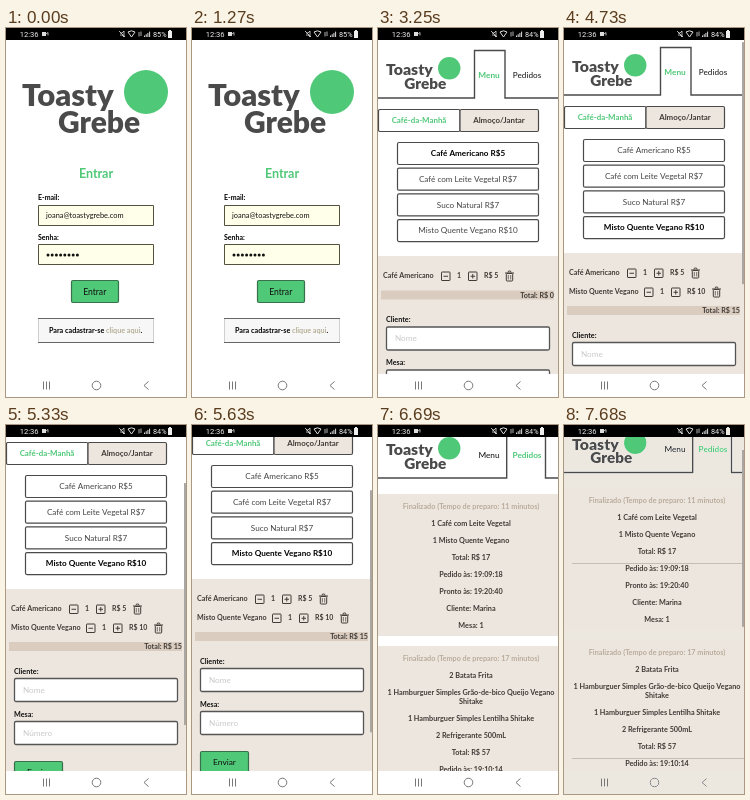
An HTML page with a canvas that plays this animation: 180 px wide and 369 px high, repeating every 8000 ms.

```html
<!DOCTYPE html>
<html lang="pt-BR">
<head>
<meta charset="utf-8">
<style>
html, body { margin: 0; width: 100%; height: 100%; overflow: hidden; background: #fff; }
canvas { display: block; width: 180px; height: 369px; }
</style>
</head>
<body>
<canvas id="stage"></canvas>
<script>
const W = 180, H = 369, LOOP = 8000;
const BAR = 12, NAV = 346;
const GREEN = '#4fc878', DARK = '#4a4a4a', INK = '#403b37', BEIGE = '#ede6de', BAND = '#dacdc0';
const WARM = '#ece8df', WARM_START = 7420;
const canvas = document.getElementById('stage');
const ctx = canvas.getContext('2d');
const ratio = Math.max(1, window.devicePixelRatio || 1);
canvas.width = W * ratio;
canvas.height = H * ratio;

// Each step is [start time, scroll offset].
const SCROLL = [
  [0, 0], [4590, 2], [4730, 3], [5130, 12], [5230, 36], [5330, 64], [5430, 84],
  [5530, 82], [5630, 74], [5730, 54], [5830, 36], [5930, 24], [6030, 19],
  [6130, 17], [7420, 20], [7680, 22.5]
];
const PRODUCTS = [
  'Café Americano R$5', 'Café com Leite Vegetal R$7',
  'Suco Natural R$7', 'Misto Quente Vegano R$10'
];
const ORDERS = [
  { top: 86, height: 142, lines: [
    'Finalizado (Tempo de preparo: 11 minutos)', '1 Café com Leite Vegetal',
    '1 Misto Quente Vegano', 'Total: R$ 17', 'Pedido às: 19:09:18',
    'Pronto às: 19:20:40', 'Cliente: Marina', 'Mesa: 1'] },
  { top: 238, height: 180, lines: [
    'Finalizado (Tempo de preparo: 17 minutos)', '2 Batata Frita',
    '1 Hamburguer Simples Grão-de-bico Queijo Vegano\nShitake',
    '1 Hamburguer Simples Lentilha Shitake', '2 Refrigerante 500mL',
    'Total: R$ 57', 'Pedido às: 19:10:14', 'Pronto às: 19:27:36'] }
];

function text(str, x, y, size, { color = '#111', weight = 400, align = 'left', font = 'Lato' } = {}) {
  ctx.font = `${weight} ${size}px ${font}, sans-serif`;
  ctx.textAlign = align;
  ctx.textBaseline = 'alphabetic';
  ctx.fillStyle = color;
  ctx.fillText(str, x, y + size * 0.35);
}

function rect(x, y, w, h, color) {
  ctx.fillStyle = color;
  ctx.fillRect(x, y, w, h);
}

function box(x, y, w, h, fill, stroke = DARK, radius = 1.5, line = 1.2) {
  ctx.beginPath();
  ctx.roundRect(x + 0.5, y + 0.5, w - 1, h - 1, radius);
  ctx.fillStyle = fill;
  ctx.fill();
  ctx.lineWidth = line;
  ctx.strokeStyle = stroke;
  ctx.stroke();
}

function path(points, color, width = 1) {
  ctx.beginPath();
  points.forEach(([x, y], i) => i ? ctx.lineTo(x, y) : ctx.moveTo(x, y));
  ctx.lineWidth = width;
  ctx.strokeStyle = color;
  ctx.stroke();
}

function disc(x, y, r, color) {
  ctx.beginPath();
  ctx.arc(x, y, r, 0, Math.PI * 2);
  ctx.fillStyle = color;
  ctx.fill();
}

function brand(x, y, scale) {
  ctx.save();
  ctx.translate(x, y);
  ctx.scale(scale, scale);
  const style = { color: DARK, weight: 900 };
  text('Toasty', 0, 23, 31, style);
  text('Grebe', 36, 50, 30, style);
  disc(124, 20, 22, GREEN);
  ctx.restore();
}

function drawLogin() {
  const label = { weight: 700, color: '#000' };
  brand(16, 44, 1);
  text('Entrar', 90, 146, 12.5, { color: GREEN, weight: 700, align: 'center' });
  text('E-mail:', 32, 169.5, 7, label);
  text('Senha:', 32, 209.5, 7, label);
  for (const y of [177, 216]) box(32, y, 116, 21, '#ffffea', '#55513f', 0, 1);
  text('joana@toastygrebe.com', 40, 187.5, 7.4);
  for (let i = 0; i < 8; i++) disc(42 + i * 4.2, 227, 1.5, '#111');
  box(65, 252, 48, 23, GREEN, '#39704c');
  text('Entrar', 88.7, 263.5, 8.6, { align: 'center' });
  box(32, 290, 116, 25, '#f7f7f7', '#d0d0d0', 0, 1);
  for (const y of [290.5, 314.5]) path([[32, y], [148, y]], '#666');
  const lead = 'Para cadastrar-se ', link = 'clique aqui';
  text(lead, 43, 302, 7.2, label);
  const linkX = 43 + ctx.measureText(lead).width;
  text(link, linkX, 302, 7.2, { weight: 700, color: '#b5b098' });
  text('.', linkX + ctx.measureText(link).width, 302, 7.2, label);
}

function drawHeader(ordersOpen) {
  const [left, right] = ordersOpen ? [128.7, 167.5] : [96.5, 127];
  brand(8, 30, 0.51);
  path([[0, 70], [left, 70], [left, 22.5], [right, 22.5], [right, 70], [W, 70]], DARK, 1.4);
  const tab = active => ({ align: 'center', color: active ? GREEN : '#111', weight: active ? 700 : 400 });
  text('Menu', 111, 47, 8.3, tab(!ordersOpen));
  text('Pedidos', 149, 47, 8.2, tab(ordersOpen));
}

function drawItem(name, price, controls, y) {
  const bold = { weight: 700, color: INK };
  text(name, 5, y, 7.15, bold);
  for (const x of [controls, controls + 27]) {
    box(x, y - 4, 9.5, 9.5, BEIGE, INK, 0.5, 1);
    path([[x + 2.5, y + 0.75], [x + 7, y + 0.75]], INK);
  }
  path([[controls + 31.75, y - 1.5], [controls + 31.75, y + 3]], INK);
  text('1', controls + 18, y, 7, { ...bold, align: 'center' });
  text(price, controls + 43, y, 7, bold);
  const bin = controls + (price.length > 4 ? 68 : 64);
  path([[bin, y - 2.5], [bin + 9, y - 2.5]], INK);
  path([[bin + 3, y - 3], [bin + 3.5, y - 4.5], [bin + 5.5, y - 4.5], [bin + 6, y - 3]], INK, 0.9);
  box(bin + 0.8, y - 2.5, 7.4, 8.5, BEIGE, INK, 0.8, 1);
  for (const dx of [3.3, 5.7]) path([[bin + dx, y - 0.5], [bin + dx, y + 4]], INK, 0.7);
}

function drawField(label, hint, y) {
  text(label, 8, y, 7.2, { weight: 700 });
  box(8, y + 7, 164, 24, '#fff', '#555', 1.5, 1.3);
  text(hint, 17, y + 19, 8.2, { color: '#c9c9c9' });
}

function drawMenu(t) {
  const bold = { weight: 700, align: 'center' };
  drawHeader(false);
  box(0, 81, 82.5, 23, '#fff');
  box(81.5, 81, 79.5, 23, BEIGE);
  text('Café-da-Manhã', 41, 92.5, 7.9, { ...bold, color: GREEN });
  text('Almoço/Jantar', 121, 92.5, 7.9, { ...bold, color: INK });
  if (t < 1790) return;

  const focused = t >= 4020 ? 3 : t >= 3250 ? 0 : -1;
  PRODUCTS.forEach((name, i) => {
    const y = 125.3 + i * 25.7;
    box(19, y - 11.3, 142, 23, '#fff');
    text(name, 90, y, 8.15, { align: 'center', color: i === focused ? '#000' : '#444', weight: i === focused ? 700 : 400 });
  });

  const count = t >= 4020 ? 2 : t >= 3250 ? 1 : 0;
  const shift = [0, 27.5, 46][count];
  const total = t >= 4590 ? 15 : t >= 3540 ? 5 : 0;
  rect(0, 228, W, 260, BEIGE);
  if (count > 0) drawItem('Café Americano', 'R$ 5', 63, 247.5);
  if (count > 1) drawItem('Misto Quente Vegano', 'R$ 10', 80, 266.5);
  rect(3, 235 + shift, 173, 9, BAND);
  text('Total: R$ ' + total, 176, 239.5 + shift, 7.15, { weight: 700, align: 'right', color: INK });
  drawField('Cliente:', 'Nome', 264 + shift);
  drawField('Mesa:', 'Número', 307 + shift);
  box(8, 354 + shift, 49, 22, GREEN, '#39704c');
  text('Enviar', 32.5, 365 + shift, 8.4, { align: 'center' });
}

function drawOrders(t) {
  drawHeader(true);
  if (t < 6690) return;
  for (const { top, height, lines } of ORDERS) {
    rect(0, top, W, height, BEIGE);
    let y = top + 12;
    lines.forEach((line, i) => {
      if (t >= WARM_START && line.startsWith('Pedido')) {
        path([[8, y - 5], [W, y - 5]], '#c4bdb3');
      }
      const parts = line.split('\n');
      parts.forEach((part, j) => text(part, 93, y + j * 9, 7.25, {
        weight: 700, align: 'center', color: i ? INK : '#b9ac9b'
      }));
      y += 17 + (parts.length - 1) * 9;
    });
  }
}

function drawScrollbar(t, offset) {
  if (t >= 4590 && t < 6590) rect(178, BAR + offset * 0.72, 2, 242, '#aaa6a2');
  if (t >= 7420) rect(178, BAR + offset * 0.57, 2, 177, '#aaa6a2');
}

function drawStatus(t) {
  const white = { color: '#eee', font: 'Roboto' };
  rect(0, 0, W, BAR, '#000');
  text('12:36', 13.7, 6, 7.6, white);
  rect(36, 4, 4, 4, '#ddd');
  path([[40, 6], [42, 4.5], [42, 7.5]], '#ddd', 0.8);
  path([[114, 5], [116, 5], [118, 3], [118, 9], [116, 7], [114, 7]], '#ddd', 0.8);
  path([[113, 3], [119, 9]], '#ddd', 0.8);
  path([[122, 4], [125.5, 9], [129, 4], [125.5, 2.8], [122, 4]], '#ddd', 1);
  path([[133, 4], [133, 8.5]], '#ddd', 0.8);
  path([[135, 3.5], [135, 8]], '#ddd', 0.8);
  for (let i = 0; i < 4; i++) rect(138 + i * 1.7, 7.5 - i * 1.3, 1, 1.5 + i * 1.3, '#ddd');
  text(t < 1640 ? '85%' : '84%', 147, 6, 7.3, white);
  rect(162, 3, 4, 7, '#eee');
  rect(163, 2, 2, 1, '#eee');
}

function drawNavigation() {
  const gray = '#777';
  rect(0, NAV, W, H - NAV, '#fff');
  for (const x of [37.5, 40.5, 43.5]) path([[x, 353.5], [x, 361.5]], gray);
  ctx.beginPath();
  ctx.arc(90.5, 357.5, 4.3, 0, Math.PI * 2);
  ctx.stroke();
  path([[142.5, 353.5], [138, 357.5], [142.5, 361.5]], gray);
}

function render(t) {
  const offset = SCROLL.findLast(([start]) => t >= start)[1];
  ctx.setTransform(ratio, 0, 0, ratio, 0, 0);
  rect(0, 0, W, H, '#fff');
  ctx.save();
  ctx.translate(0, -offset);
  if (t < 1640) drawLogin();
  else if (t < 6590) drawMenu(t);
  else drawOrders(t);
  ctx.restore();
  drawScrollbar(t, offset);
  drawStatus(t);
  drawNavigation();
  if (t >= WARM_START) {
    ctx.globalCompositeOperation = 'darken';
    rect(0, 0, W, H, WARM);
    ctx.globalCompositeOperation = 'source-over';
  }
}

const began = performance.now();
function tick() {
  render((performance.now() - began) % LOOP);
  requestAnimationFrame(tick);
}
tick();
</script>
</body>
</html>
```
